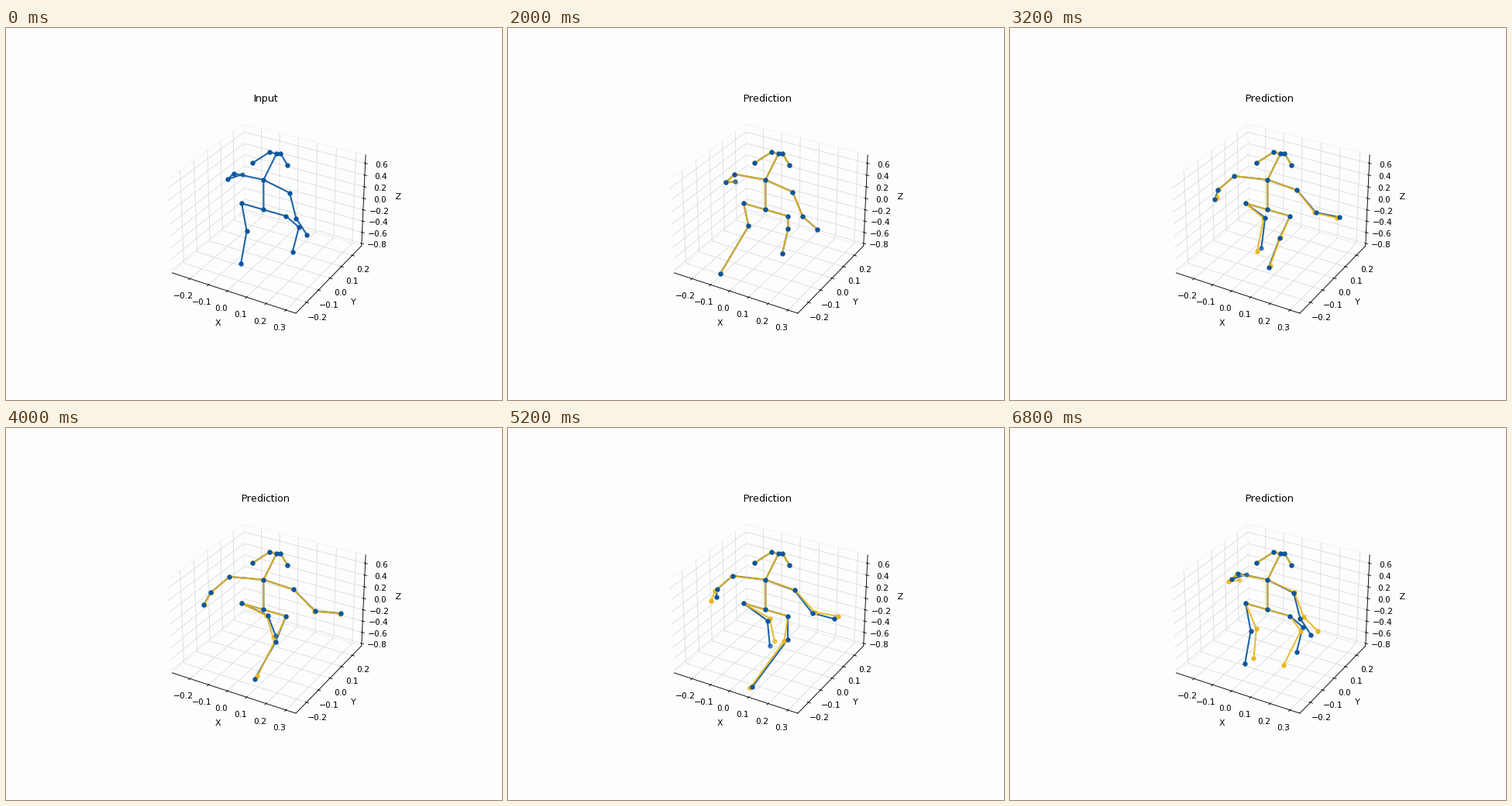
A matplotlib script that plays this animation: 640x480 px, repeating every 7 s.

```python
import numpy as np
import matplotlib.pyplot as plt
from matplotlib.animation import FuncAnimation

W, H, DPI = 640, 480, 80
FRAMES, INTERVAL = 35, 200
FIRST_PREDICTED = 10
BLUE, YELLOW = "#0b559f", "#ebb61c"

STRIDE = 34                      # frames per walking cycle
OMEGA = 2 * np.pi / STRIDE
REACH = 20.5                     # when the right leg is furthest forward
THIGH, SHANK = 0.45, 0.42
TOWARD_VIEWER = np.array([0.80, -1.56, 0.28])

CHAINS = [
    ["pelvis", "chest", "nose"],
    ["nose", "eye_r", "ear_r"],
    ["nose", "eye_l", "ear_l"],
    ["chest", "shoulder_r", "elbow_r", "wrist_r"],
    ["chest", "shoulder_l", "elbow_l", "wrist_l"],
    ["pelvis", "hip_r", "knee_r", "ankle_r"],
    ["pelvis", "hip_l", "knee_l", "ankle_l"],
]


def swing(t, peak=REACH):
    return np.cos(OMEGA * (t - peak))


def hanging(x, y, length):
    """Bone of fixed length that points down."""
    return np.array([x, y, -np.sqrt(length ** 2 - x ** 2 - y ** 2)])


def leg(t, side):
    """Hip, knee and ankle; the left leg is half a stride off the right."""
    s = t if side < 0 else t + STRIDE / 2
    sway = 0.029 * swing(t, 27.75 + 2.75 * side)
    bend = (-0.089 + 0.13 * swing(s, 24.45)
            + 0.046 * np.cos(2 * OMEGA * (s - 1.46)))
    hip = np.array([0.117 * side, 0, 0])
    knee = hip + hanging(sway - 0.031 * side, 0.06 + 0.08 * swing(s), THIGH)
    ankle = knee + hanging(-0.018 * side, bend, SHANK)
    return hip, knee, ankle


def arm(t, side, chest):
    """Shoulder, elbow and wrist, swinging against the leg on that side."""
    k = swing(t + STRIDE / 2 if side < 0 else t)
    shoulder = chest + [0.155 * side, 0.018 * (k - 1), -0.024]
    if side < 0:
        upper = [-0.074, 0.015 + 0.056 * k, -0.265]
        fore = [-0.02, 0.068 + 0.095 * k, -0.18]
    else:
        upper = [0.085 + 0.024 * k, -0.028 + 0.03 * k, -0.265]
        fore = [0.066, 0.04 + 0.072 * k, -0.18]
    elbow = shoulder + upper
    return shoulder, elbow, elbow + fore


def walk(t):
    """All joints at time t, with the pelvis at the origin."""
    chest = np.array([0, 0, 0.507])
    nose = chest + [0.013, 0.083, 0.30]
    pose = {"pelvis": np.zeros(3), "chest": chest, "nose": nose}
    for tag, side in (("_r", -1), ("_l", 1)):
        eye = nose + [0.025 * side - 0.005, 0.006 * side - 0.003, 0.02]
        pose["eye" + tag] = eye
        pose["ear" + tag] = eye + [0.049 * side + 0.005,
                                   0.02 * side - 0.049, -0.105]
        for names, joints in (
                (("hip", "knee", "ankle"), leg(t, side)),
                (("shoulder", "elbow", "wrist"), arm(t, side, chest))):
            pose.update({n + tag: p for n, p in zip(names, joints)})
    return pose


class Skeleton:
    def __init__(self, ax, color, line_z, dot_z):
        dot = dict(ls="", marker="o", ms=4.5, mew=1.2, color=color,
                   zorder=dot_z)
        self.bones, = ax.plot([], [], [], lw=1.9, color=color, alpha=0.9,
                              zorder=line_z)
        self.dots, = ax.plot([], [], [], **dot)
        self.far, = ax.plot([], [], [], alpha=0.65, **dot)

    def show(self, pose):
        gap = np.full(3, np.nan)
        path = [p for chain in CHAINS
                for p in [pose[name] for name in chain] + [gap]]
        # The joint deepest in the scene is drawn paler.
        joints = np.array(sorted(pose.values(),
                                 key=lambda p: p @ TOWARD_VIEWER))
        self.bones.set_data_3d(*np.array(path).T)
        self.dots.set_data_3d(*joints[1:].T)
        self.far.set_data_3d(*joints[:1].T)

    def set_visible(self, on):
        for artist in (self.bones, self.dots, self.far):
            artist.set_visible(on)


plt.rcParams.update({"font.family": "DejaVu Sans", "grid.color": "#dddddd",
                     "text.hinting_factor": 1})
fig = plt.figure(figsize=(W / DPI, H / DPI), dpi=DPI, facecolor="#fdfdfd")

ax = fig.add_axes([193 / W, 94 / H, 284 / W, 284 / H], projection="3d")
ax.patch.set_visible(False)
truth = Skeleton(ax, BLUE, line_z=4, dot_z=7)
guess = Skeleton(ax, YELLOW, line_z=5, dot_z=6)
ax.set(xlim=(-0.297, 0.349), ylim=(-0.2855, 0.2865), zlim=(-0.844, 0.738),
       xlabel="X", ylabel="Y", zlabel="Z")
ax.set_xticks(np.arange(-2, 4) / 10)
ax.set_yticks(np.arange(-2, 3) / 10)
ax.set_zticks(np.arange(-4, 4) / 5)
for axis in (ax.xaxis, ax.yaxis, ax.zaxis):
    axis.pane.set_fill(False)
    axis.pane.set_edgecolor("#ececec")
title = ax.set_title("Input")


def draw(t):
    predicting = t >= FIRST_PREDICTED
    title.set_text("Prediction" if predicting else "Input")
    truth.show(walk(t))
    guess.set_visible(predicting)
    if predicting:
        # The prediction falls ever further behind the true motion.
        guess.show(walk(t - 0.1 * (t - FIRST_PREDICTED)))
    return []


anim = FuncAnimation(fig, draw, frames=FRAMES, interval=INTERVAL,
                     repeat=True, repeat_delay=0, blit=False)
plt.show()
```
